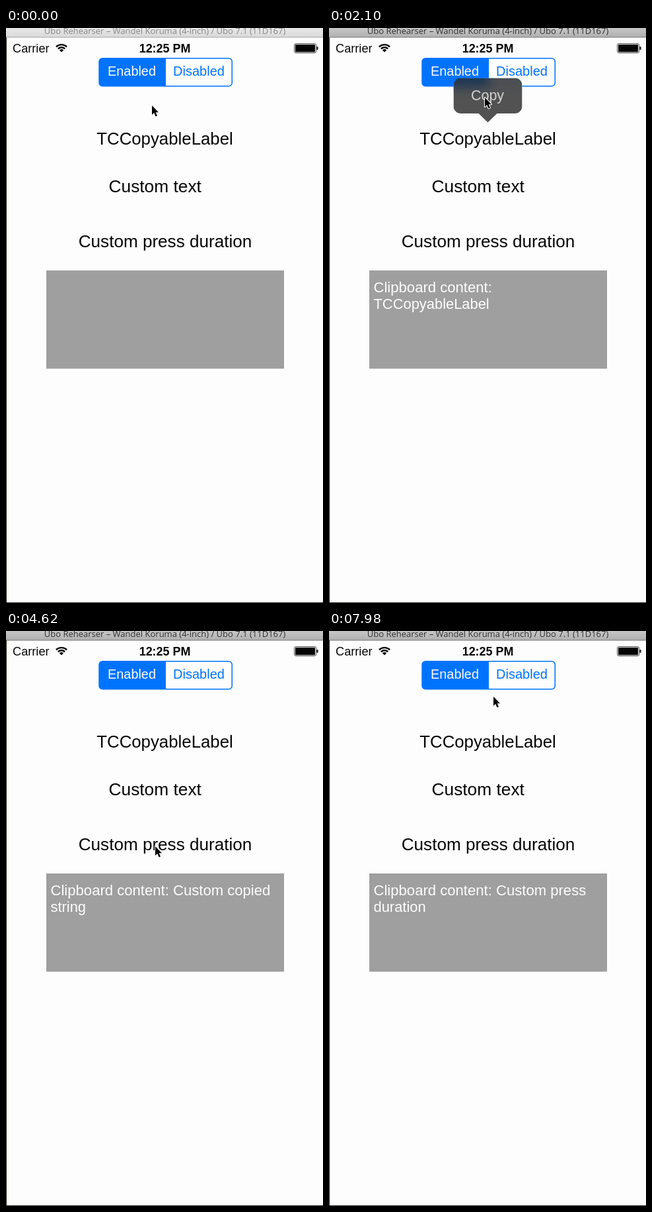
Animation of 480x868 px, one loop 8 s. Source, as an HTML page with a canvas:

```html
<!DOCTYPE html>
<html lang="en">
<head>
<meta charset="utf-8">
<title>Copyable labels</title>
<style>
html, body { margin: 0; width: 100%; height: 100%; overflow: hidden; background: #fdfdfd; }
canvas { display: block; width: 100vw; height: 100vh; }
</style>
</head>
<body>
<canvas id="stage" width="480" height="868"></canvas>
<script>
const canvas = document.getElementById('stage');
const ctx = canvas.getContext('2d');
const LOOP = 8000, STEP = 60, ACTIVE_AT = 600;
const SANS = '"Liberation Sans", Arial, sans-serif';
const PAPER = '#fdfdfd', BLUE = '#0073fd', INK = '#050505', EDGE = '#1c2418';

// Pointer stops: time, x, y
const path = [
  [0, 221, 117], [120, 221, 117], [540, 232, 163], [1500, 232, 163],
  [1860, 236, 105], [2160, 236, 105], [2520, 216, 238], [3360, 216, 238],
  [3660, 220, 180], [4020, 220, 180], [4440, 226, 325], [7140, 226, 325],
  [7380, 231, 256], [7620, 231, 256], [7980, 249, 99]
];

const menus = [
  { x: 240.5, tip: 142.5, show: 1200, pick: 2040 },
  { x: 225.5, tip: 214.5, show: 3120, pick: 3780 },
  { x: 242, tip: 297, show: 6720, pick: 7500 }
];

const clips = [
  [2040, 'Clipboard content:', 'TCCopyableLabel'],
  [3780, 'Clipboard content: Custom copied', 'string'],
  [7500, 'Clipboard content: Custom press', 'duration']
];

const clamp = v => Math.max(0, Math.min(1, v));
const ease = v => v * v * (3 - 2 * v);

function rect(x, y, w, h, color) {
  ctx.fillStyle = color;
  ctx.fillRect(x, y, w, h);
}

function text(str, x, y, size, color, align = 'center', weight = '', family = SANS) {
  ctx.font = `${weight} ${size}px ${family}`;
  ctx.textAlign = align;
  ctx.fillStyle = color;
  ctx.fillText(str, x, y);
}

function titleBar(active) {
  const shade = ctx.createLinearGradient(0, 0, 0, 14);
  shade.addColorStop(0, active ? '#c6c6c6' : '#e8e8e8');
  shade.addColorStop(1, active ? '#b0b0b0' : '#d9d9d9');
  rect(0, 0, 480, 14, shade);
  rect(0, 13.5, 480, 1, active ? '#777777' : '#a8a8a8');
  text('Ubo Rehearser – Wandel Koruma (4-inch) / Ubo 7.1 (11D167)', 240.5, 9, 13,
    active ? '#303030' : '#858585', 'center', '', '"Open Sans", sans-serif');
}

function wifi() {
  const x = 84, y = 36.5, from = -Math.PI * 0.75, to = -Math.PI * 0.25;
  ctx.strokeStyle = ctx.fillStyle = INK;
  ctx.lineWidth = 2.4;
  for (const r of [7.3, 11.4]) {
    ctx.beginPath();
    ctx.arc(x, y, r, from, to);
    ctx.stroke();
  }
  ctx.beginPath();
  ctx.moveTo(x, y);
  ctx.arc(x, y, 4.4, from, to);
  ctx.fill();
}

function statusBar() {
  text('Carrier', 10, 37, 18.2, INK, 'left');
  wifi();
  text('12:25 PM', 240.5, 37, 17.9, INK, 'center', 'bold');
  ctx.strokeStyle = INK;
  ctx.lineWidth = 0.75;
  ctx.beginPath();
  ctx.roundRect(436.6, 23.6, 33, 14, 2.5);
  ctx.stroke();
  ctx.beginPath();
  ctx.roundRect(438, 25, 30, 11.2, 1);
  ctx.roundRect(470.5, 28, 2, 5, 1);
  ctx.fillStyle = INK;
  ctx.fill();
}

function segments() {
  ctx.beginPath();
  ctx.roundRect(141, 46, 101, 42, [5, 0, 0, 5]);
  ctx.fillStyle = BLUE;
  ctx.fill();
  ctx.strokeStyle = BLUE;
  ctx.lineWidth = 1.5;
  ctx.beginPath();
  ctx.roundRect(141, 45.75, 201.25, 42, 5);
  ctx.stroke();
  text('Enabled', 190.5, 72, 19.9, PAPER);
  text('Disabled', 292, 72, 20, BLUE);
}

function clipboard(t) {
  rect(61, 366, 360, 148.3, '#9f9f9f');
  const clip = clips.filter(c => t >= c[0]).pop();
  if (!clip) return;
  text(clip[1], 67.5, 399, 22.1, PAPER, 'left');
  text(clip[2], 67.5, 424, 21.9, PAPER, 'left');
}

// The bubble blurs whatever lies behind it, and only its tint fades.
function menu({ x, tip, show, pick }, t) {
  const alpha = Math.min(clamp((t - show) / 200), 1 - clamp((t - pick) / 300));
  if (alpha <= 0) return;
  const left = x - 52, top = tip - 67, base = tip - 13.5;
  ctx.save();
  ctx.beginPath();
  ctx.roundRect(left, top, 104, 53.5, 11);
  ctx.moveTo(x + 14, base);
  ctx.lineTo(x, tip);
  ctx.lineTo(x - 14, base);
  ctx.closePath();
  ctx.clip();
  ctx.filter = 'blur(9px)';
  ctx.drawImage(canvas, 0, 0);
  ctx.filter = 'none';
  ctx.globalAlpha = alpha;
  rect(left, top, 104, 67, 'rgba(30, 30, 30, 0.95)');
  text('Copy', x - 0.5, tip - 33.5, 21.5, '#f4f4f4');
  ctx.restore();
}

function pointer(t) {
  const i = path.findIndex(p => p[0] >= t);
  const b = path[i], a = path[Math.max(0, i - 1)];
  const k = ease(clamp((t - a[0]) / (b[0] - a[0] || 1)));
  ctx.save();
  ctx.translate(a[1] + (b[1] - a[1]) * k, a[2] + (b[2] - a[2]) * k);
  ctx.beginPath();
  ctx.moveTo(0, 0);
  for (const [x, y] of [[0, 14], [3.2, 11], [5.6, 16.5], [8, 15.4], [5.7, 10.2], [10, 10.2]]) {
    ctx.lineTo(x, y);
  }
  ctx.closePath();
  ctx.lineJoin = 'round';
  ctx.lineWidth = 2;
  ctx.strokeStyle = '#ffffff';
  ctx.stroke();
  ctx.fillStyle = '#000';
  ctx.fill();
  ctx.restore();
}

function draw(t) {
  rect(0, 0, 480, 868, PAPER);
  titleBar(t >= ACTIVE_AT);
  rect(0, 14, 1, 854, EDGE);
  rect(0, 867, 480, 1, EDGE);
  statusBar();
  segments();
  text('TCCopyableLabel', 240.5, 176, 25.8, INK);
  text('Custom text', 225.7, 248, 26.3, INK);
  text('Custom press duration', 241, 330.5, 26.1, INK);
  clipboard(t);
  menus.forEach(m => menu(m, t));
  pointer(t);
}

const start = performance.now();
function tick() {
  const t = (performance.now() - start) % LOOP;
  draw(Math.floor(t / STEP) * STEP);
  requestAnimationFrame(tick);
}
tick();
</script>
</body>
</html>
```
